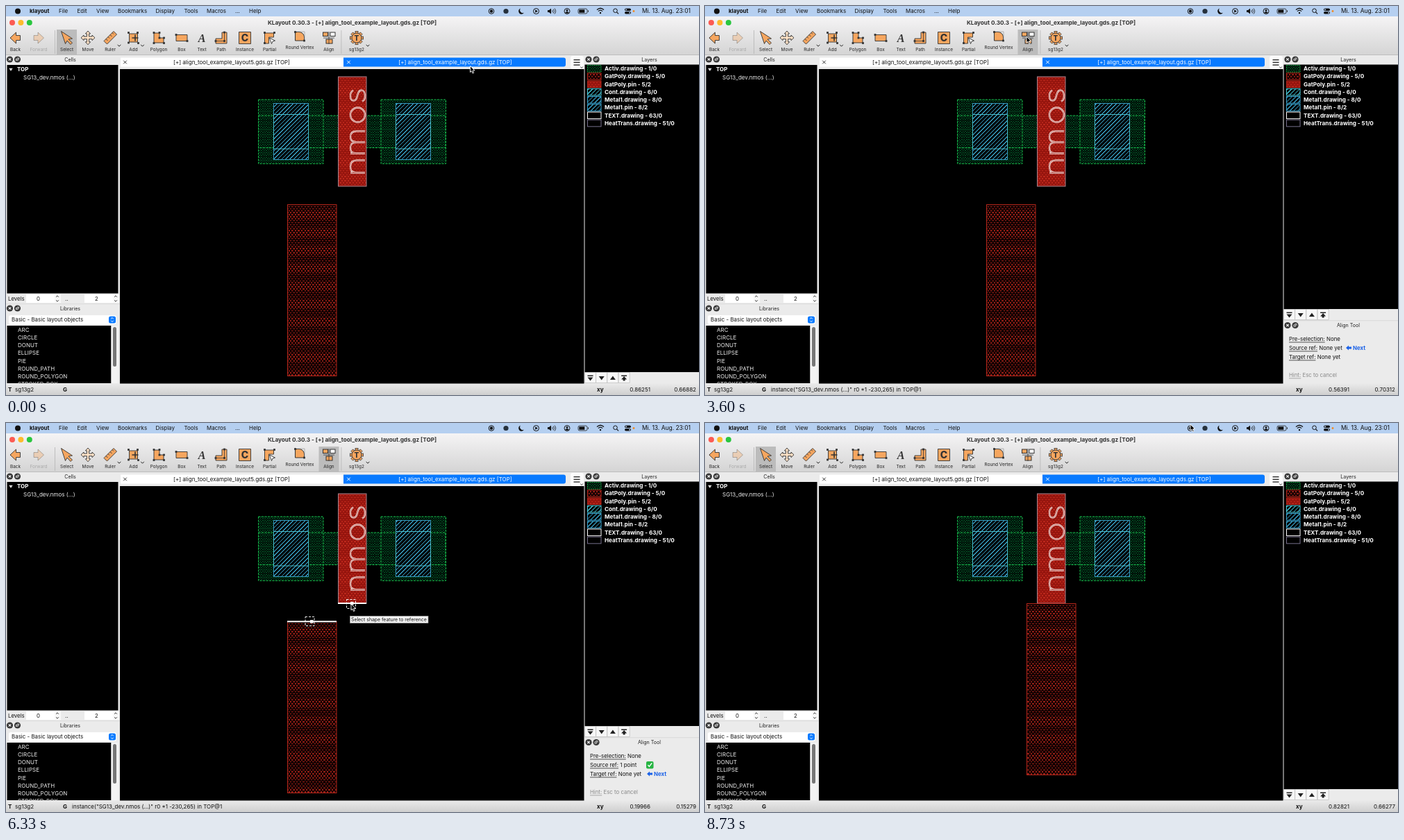
An HTML page with a canvas for the animation above (8.8 s loop, 998x561 px).

```html
<!DOCTYPE html>
<html lang="en">
<head>
<meta charset="utf-8">
<title>Layout alignment</title>
<style>
  html, body { margin: 0; width: 100%; height: 100%; overflow: hidden; background: #000; }
  canvas { display: block; width: 998px; height: 561px; }
</style>
</head>
<body>
<canvas id="stage" width="998" height="561"></canvas>
<script>
const g = document.getElementById('stage').getContext('2d');
const LOOP = 8800;
const ORANGE = '#f6a65f', INK = '#333', BLUE = '#087aff', PANEL = '#ebebeb';

// ---- drawing helpers ----
function rect(x, y, w, h, fill, stroke, lineWidth = 1) {
  if (fill) { g.fillStyle = fill; g.fillRect(x, y, w, h); }
  if (stroke) { g.strokeStyle = stroke; g.lineWidth = lineWidth; g.strokeRect(x, y, w, h); }
}
function round(x, y, w, h, r, fill) {
  g.beginPath(); g.roundRect(x, y, w, h, r); g.fillStyle = fill; g.fill();
}
function disc(x, y, r, fill, stroke, lineWidth = 1) {
  g.beginPath(); g.arc(x, y, r, 0, 7);
  if (fill) { g.fillStyle = fill; g.fill(); }
  if (stroke) { g.strokeStyle = stroke; g.lineWidth = lineWidth; g.stroke(); }
}
function shape(d, x, y, fill, stroke, lineWidth = 1) {
  const path = new Path2D(d);
  g.save(); g.translate(x, y);
  if (fill) { g.fillStyle = fill; g.fill(path); }
  if (stroke) { g.strokeStyle = stroke; g.lineWidth = lineWidth; g.stroke(path); }
  g.restore();
}
// y is the middle of the capital letters
function text(s, x, y, { size = 8, weight = 400, color = '#111', align = 'left', family = 'Inter, sans-serif', style = '' } = {}) {
  g.font = `${style} ${weight} ${size}px ${family}`;
  g.textAlign = align; g.fillStyle = color;
  g.fillText(s, x, y + size * 0.36);
  return g.measureText(s).width;
}
function gradient(y0, y1, from, to) {
  const fill = g.createLinearGradient(0, y0, 0, y1);
  fill.addColorStop(0, from); fill.addColorStop(1, to);
  return fill;
}

// Fill tiles are drawn in screen points and scaled down to the stage.
const POINT = 0.5775, DETAIL = 4;
function pattern(w, h, back, draw) {
  const tile = new OffscreenCanvas(w * DETAIL, h * DETAIL), c = tile.getContext('2d');
  c.scale(DETAIL, DETAIL);
  c.fillStyle = back; c.fillRect(0, 0, w, h);
  draw(c);
  const fill = g.createPattern(tile, 'repeat');
  fill.setTransform(new DOMMatrix().scale(POINT / DETAIL));
  return fill;
}
const dots = (w, h, back, color) => pattern(w, h, back, c => {
  c.fillStyle = color;
  c.fillRect(0, 0, w / 2, h / 4); c.fillRect(w / 2, h / 2, w / 2, h / 4);
});
const hatch = (size, color) => pattern(size, size, '#000', c => {
  c.strokeStyle = color; c.lineWidth = 1.9;
  for (let k = 0; k <= 2; k++) { c.moveTo(k * size + 2, -2); c.lineTo(k * size - size - 2, size + 2); }
  c.stroke();
});
const fills = {
  activ: dots(6, 6, '#001208', '#05592a'),
  poly: dots(8, 10, '#150303', '#981f16'),
  pin: dots(8, 10, '#96150e', '#bd281c'),
  metal: hatch(10, '#369bbd'),
  cont: hatch(10, '#3fc0cf'),
};

// ---- cursor motion ----
const SCALE = 0.003237, ORIGIN = { x: 0.15434, y: 0.13013, px: 483, py: 268 };
const toPixels = (x, y) => [ORIGIN.px + (x - ORIGIN.x) / SCALE, ORIGIN.py - (y - ORIGIN.y) / SCALE];
const toMicrons = ([px, py]) => [ORIGIN.x + (px - ORIGIN.px) * SCALE, ORIGIN.y - (py - ORIGIN.py) * SCALE];
const START = [0.86251, 0.66882], EXIT_TOP = [0.56391, 0.70312], EXIT_END = [0.82821, 0.66277];
const BELOW_TABS = toPixels(0.67487, 0.64663), ASIDE = toPixels(1.0219, 0.26531);
const ALIGN_CLICK = 2850, SOURCE_CLICK = 4850, TARGET_CLICK = 6620;
const SOURCE_POINT = [437.5, 286], TARGET_POINT = [497, 261];
const route = [
  [0, 668.5, 86.5], [200, 668.5, 86.5],
  [850, ...BELOW_TABS], [1100, ...BELOW_TABS],
  [1400, ...toPixels(...EXIT_TOP)], [1950, 421, 34], [2150, 421, 34],
  [2650, 463, 44], [3650, 463, 44],
  [4450, ...SOURCE_POINT], [4950, ...SOURCE_POINT],
  [5400, ...toPixels(0.15434, 0.13013)], [5800, ...TARGET_POINT], [TARGET_CLICK, ...TARGET_POINT],
  [7000, ...ASIDE], [7480, ...ASIDE],
  [8000, ...toPixels(...EXIT_END)], [8300, 699, 2], [LOOP, 699, 2],
];
// Hermite curve through the route; the cursor rests at repeated points.
function tangent(i, axis) {
  const [a, b, c] = [route[i - 1], route[i], route[i + 1]];
  if (!a || !c || a[axis] === b[axis] || b[axis] === c[axis]) return 0;
  return (c[axis] - a[axis]) / (c[0] - a[0]);
}
function cursorAt(t) {
  const i = Math.max(1, route.findIndex(k => k[0] > t));
  const a = route[i - 1], b = route[i], span = b[0] - a[0], u = (t - a[0]) / span;
  return [1, 2].map(axis =>
    a[axis] + (b[axis] - a[axis]) * u * u * (3 - 2 * u)
    + span * u * (1 - u) * ((1 - u) * tangent(i - 1, axis) - u * tangent(i, axis)));
}
const overCanvas = ([x, y]) => x > 164 && x < 832 && y > 92 && y < 544;

// ---- menu bar and toolbar ----
function menuBar() {
  rect(0, 0, 998, 15, '#b5cff0');
  disc(17, 7.5, 4, '#111');
  text('klayout', 34, 7, { size: 7.9, weight: 700 });
  const menus = { File: 76, Edit: 102.5, View: 130, Bookmarks: 161, Display: 215.5, Tools: 256.5, Macros: 289, '...': 330, Help: 350 };
  for (const name in menus) text(name, menus[name], 7, { size: 7.95 });
  disc(699, 7.5, 3.8, null, '#111'); disc(699, 7.5, 2.2, '#111');
  disc(720, 7.5, 3.6, '#26313c');
  shape('M-1,-4A4.2,4.2 0 1 0 4,2A4,4 0 0 1-1,-4Z', 742, 7.5, '#111');
  disc(763.5, 7.5, 4, null, '#111'); shape('M-1.3,-2.3L2.4,0L-1.3,2.3Z', 763.5, 7.5, '#111');
  shape('M-5,-1.5h2l3,-2.5v8l-3,-2.5h-2Z', 785, 7.5, '#111');
  shape('M1.5,-1.6q1.4,1.6 0,3.2M3.2,-3q2.6,3 0,6M5,-4q3.3,4 0,8', 785, 7.5, null, '#111', 0.8);
  disc(808, 7.5, 4, null, '#111'); disc(808, 6.3, 1.4, '#111'); shape('M-2.6,3a2.6,2.6 0 0 1 5.2,0Z', 808, 7.5, '#111');
  g.beginPath(); g.roundRect(824, 4, 13, 7, 2); g.strokeStyle = '#222'; g.lineWidth = 0.8; g.stroke();
  rect(825.3, 5.3, 8, 4.4, '#111'); rect(838, 6.3, 1, 2.4, '#333');
  shape('M-5,-1.5q5,-4.6 10,0M-3.1,.6q3.1,-3 6.2,0', 856, 7, null, '#111', 1.3); disc(856, 10, 1.2, '#111');
  disc(877.5, 6.7, 2.8, null, '#111'); shape('M0,0l2.5,2.5', 879.6, 8.8, null, '#111', 1.2);
  round(891, 3.5, 9, 3.5, 1.8, '#111'); disc(893, 5.2, 1, '#b5cff0');
  round(891, 8, 9, 3.5, 1.8, '#111'); disc(898, 9.8, 1, '#b5cff0');
  disc(904, 7.5, 1.4, '#f08a24');
  text('Mi. 13. Aug. 23:01', 986, 7, { size: 8.45, align: 'right' });
}

const node = (x, y) => rect(x - 1.4, y - 1.4, 2.8, 2.8, INK);
const outlined = (d, x, fill = ORANGE) => shape(d, x, 46, fill, INK, 0.9);
const nodes = (x, ...points) => points.forEach(([dx, dy]) => node(x + dx, 46 + dy));
const ARROW = 'M-7.5,0L1,-8V-3.5H7V3.5H1V8Z';
const tools = [
  ['Back', 13.5, x => outlined(ARROW, x)],
  ['Forward', 47, x => { g.save(); g.globalAlpha = 0.35; g.translate(2 * x, 0); g.scale(-1, 1); outlined(ARROW, x); g.restore(); }],
  ['Select', 87.5, x => outlined('M-8,-9.5L8,1L2.5,2L8,7L5.5,9.5L.5,4L-2,8.5Z', x)],
  ['Move', 118, x => outlined('M0,-10l3.6,4h-2v4h4.4v-2l4,3.8l-4,3.8v-2h-4.4v4.2h2l-3.6,4l-3.6,-4h2v-4.2h-4.4v2l-4,-3.8l4,-3.8v2h4.4v-4h-2Z', x, '#fbe0c5')],
  ['Ruler', 150, x => { outlined('M-9,4.5L5,-9.5L9.5,-5L-4.5,9Z', x); shape('M-6,1.5l2.5,2.5M-3,-1.5l2,2M0,-4.5l2.5,2.5M3,-7.5l2,2', x, 46, null, INK, 0.9); }],
  ['Add', 183.5, x => { outlined('M-6,-6H6V6H-6Z', x); shape('M-2,0h9M2.5,-4.5v9', x, 46, null, INK, 1.6); nodes(x, [-7, -7.5], [6, -7.5], [-7, 7], [7, 7.5]); }],
  ['Polygon', 220, x => { outlined('M-7,-7H1V0H7V7H-7Z', x); nodes(x, [-7, -7.5], [1, -7.5], [1, 0], [7.5, 0], [7.5, 7.5], [-7, 7.5]); }],
  ['Box', 253, x => { outlined('M-8,-4.5H8V4.5H-8Z', x); nodes(x, [-8, -4.5], [8, 4.5]); }],
  ['Text', 282, x => text('A', x, 46, { size: 16, weight: 700, style: 'italic', align: 'center', family: 'Liberation Serif, serif', color: INK })],
  ['Path', 310, x => { outlined('M-8,1H1V-8H8V8H-8Z', x); shape('M-8,4.5H4.5V-8', x, 46, null, INK, 0.8); nodes(x, [-8, 4.5], [4.5, 4.5], [4.5, -8]); }],
  ['Instance', 344, x => { outlined('M-8.5,-8.5H8.5V8.5H-8.5Z', x); text('C', x, 46, { size: 14, weight: 800, align: 'center', color: INK }); }],
  ['Partial', 379.5, x => { outlined('M-7,-7H6V-1H-1V8H-7Z', x); nodes(x, [-7, -7.5], [7, -7.5], [-7, 7.5]); shape('M0,0L8,4L4.5,5L3,8.5Z', x, 46, '#fff', INK, 0.9); }],
  ['Round Vertex', 423, x => { shape('M-6.5,-6H-1A7.5,7.5 0 0 1 6.5,1.5V6.5H-6.5Z', x, 43.5, ORANGE, INK); node(x - 6.5, 37.5); node(x + 6.5, 50); shape('M-4,-6.5H7V5', x, 43.5, null, '#999', 0.7); }],
  ['Align', 465, x => { rect(x - 8.5, 38, 7, 5.5, ORANGE, INK); rect(x + 2, 38, 7, 5.5, '#fff', INK); rect(x - 4, 48, 9, 6, ORANGE, INK); shape('M0,-9V9M-8,0H8', x, 46, null, INK, 0.8); }],
  ['sg13g2', 505, x => {
    for (let k = 0; k < 8; k++) { g.save(); g.translate(x, 46); g.rotate(k * Math.PI / 4); rect(-2, -9.5, 4, 4, ORANGE, INK, 0.8); g.restore(); }
    disc(x, 46, 7, ORANGE, INK, 0.9);
    text('T', x, 46, { size: 10, weight: 800, align: 'center', color: INK });
  }],
];
function toolbar(active) {
  rect(0, 15, 998, 56, gradient(15, 71, '#f5f4f5', '#d4d4d4'));
  ['#fc5b53', '#fdbb2d', '#2ac63f'].forEach((c, i) => disc(9 + 12.4 * i, 24, 4, c));
  text('KLayout 0.30.3 - [+] align_tool_example_layout.gds.gz [TOP]', 498.5, 24, { size: 8.2, weight: 700, align: 'center', color: '#333' });
  rect(70, 35, 0.8, 34, '#b5b5b5'); rect(482.5, 35, 0.8, 34, '#b5b5b5');
  for (const [name, x, icon] of tools) {
    if (name === active) rect(x - 14.5, 34, 29, 36, '#bcbcbc');
    icon(x);
    text(name, x, name === 'Round Vertex' ? 60 : 62.5, { size: 6.45, align: 'center', color: name === 'Forward' ? '#aaa' : '#222' });
  }
  for (const x of [163, 196.5, 521]) shape('M-2.3,-1.2L0,1.2L2.3,-1.2', x, 57, null, '#222');
  rect(0, 70, 998, 1, '#bdbdbd');
}

// ---- docks ----
function dockTitle(name, x, y, center) {
  disc(x, y, 4.6, '#383838'); shape('M-1.7,-1.7L1.7,1.7M1.7,-1.7L-1.7,1.7', x, y, null, '#fff', 1.1);
  disc(x + 11, y, 4.6, '#383838'); rect(x + 9, y - 0.6, 2.6, 2.2, null, '#fff', 0.7); shape('M10.4,-2h2.6v2.4', x, y, null, '#fff', 0.7);
  text(name, center, y, { size: 7.1, align: 'center', color: '#222' });
}
function spinner(x, value, valueX) {
  rect(x, 416, 50, 12, '#fff');
  text(value, valueX, 422, { size: 7.85, align: 'center' });
  round(x + 41, 415.5, 9, 13, 3, '#f8f8f8');
  shape('M-1.9,-2.3L0,-4.2L1.9,-2.3M-1.9,2.3L0,4.2L1.9,2.3', x + 45, 422, null, '#333', 1);
}
function leftDocks() {
  rect(0, 71, 164, 474, PANEL);
  dockTitle('Cells', 5.5, 77, 92.5);
  rect(1.5, 85, 160, 329.5, '#000');
  shape('M-2.7,-1.7H2.7L0,2.6Z', 7, 91.5, '#ddd');
  text('TOP', 16, 91.5, { weight: 700, color: '#fff' });
  text('SG13_dev.nmos (...)', 25, 103, { color: '#eee' });
  text('Levels', 3, 422, { size: 7.85 });
  spinner(29, '0', 46.5); text('..', 85, 422); spinner(113, '2', 130.5);
  rect(0, 429.5, 164, 0.6, '#cfcfcf');
  dockTitle('Libraries', 5.5, 436, 92.5);
  round(4, 446, 155, 13, 3, '#fff');
  text('Basic - Basic layout objects', 8, 452.5, { size: 7.95 });
  round(148, 447.5, 10, 10, 2.5, BLUE);
  shape('M-1.8,-1.2L0,-3L1.8,-1.2M-1.8,1.2L0,3L1.8,1.2', 153, 452.5, null, '#fff', 1);
  rect(1.5, 461, 150, 83, '#000'); rect(151.5, 461, 10, 83, '#f3f3f3');
  round(154, 463, 5, 57, 2.5, '#777');
  g.save(); g.beginPath(); g.rect(1.5, 461, 150, 83); g.clip();
  ['ARC', 'CIRCLE', 'DONUT', 'ELLIPSE', 'PIE', 'ROUND_PATH', 'ROUND_POLYGON', 'STROKED_BOX']
    .forEach((name, i) => text(name, 17, 467 + 11.2 * i, { color: '#eee' }));
  g.restore();
}

const layers = [
  ['Activ.drawing - 1/0', fills.activ, '#14a845', [2, 1]],
  ['GatPoly.drawing - 5/0', fills.poly, '#b2261b'],
  ['GatPoly.pin - 5/2', fills.pin, '#b2261b'],
  ['Cont.drawing - 6/0', fills.cont, '#4fd0dc'],
  ['Metal1.drawing - 8/0', fills.metal, '#38a4d0'],
  ['Metal1.pin - 8/2', fills.metal, '#38a4d0'],
  ['TEXT.drawing - 63/0', '#000', '#fff'],
  ['HeatTrans.drawing - 51/0', '#000', '#77708c'],
];
function alignDock(hasSource) {
  rect(833, 453.5, 165, 0.7, '#cfcfcf');
  dockTitle('Align Tool', 839, 460.5, 926.5);
  const row = (label, value, y, color = '#111') => {
    const w = text(label, 841, y, { size: 7.85, color });
    rect(841, y + 4.6, w, 0.7, color);
    text(value, 841 + w + 2.3, y, { size: 7.85, color });
  };
  row('Pre-selection:', 'None', 480);
  row('Source ref:', hasSource ? '1 point' : 'None yet', 493);
  row('Target ref:', 'None yet', 506);
  row('Hint:', 'Esc to cancel', 532, '#888');
  const y = hasSource ? 506 : 493;
  shape('M-4,0L0,-3.5V-1.4H4V1.4H0V3.5Z', 927, y, '#1b62e8');
  text('Next', 933, y, { size: 7.85, weight: 700, color: '#1b62e8' });
  if (hasSource) {
    round(922, 488, 10.5, 10.5, 2, '#27b443');
    shape('M-2.8,.2L-.8,2.4L3,-2.6', 927.2, 493, null, '#fff', 1.5);
  }
}
function rightDocks(aligning, hasSource) {
  const bottom = aligning ? 437 : 528;
  rect(832.5, 71, 166, 474, PANEL);
  dockTitle('Layers', 839, 77, 926.5);
  rect(833.5, 84.5, 165, bottom - 84.5, '#000');
  layers.forEach(([name, fill, stroke, dash], i) => {
    const y = 90.3 + 11.25 * i;
    g.setLineDash(dash || []);
    rect(837.5, y - 4.8, 19.5, 9.6, fill, stroke);
    g.setLineDash([]);
    text(name, 862, y, { size: 8.15, weight: 700, color: '#fff' });
  });
  ['M-4,-4H4V-2.6H-4ZM-4,-1H4L0,4Z', 'M-4,-2.5H4L0,3Z', 'M-4,2.5H4L0,-3Z', 'M-4,-4H4V-2.6H-4ZM-4,2H4L0,-2.5ZM-1.5,2H1.5V4H-1.5Z'].forEach((d, i) => {
    rect(833.5 + 16.2 * i, bottom + 0.5, 16, 15, '#f7f7f7', '#bbb', 0.7);
    shape(d, 841.5 + 16.2 * i, bottom + 8.5, '#222');
  });
  if (aligning) alignDock(hasSource);
}

// ---- layout view ----
function tabs() {
  rect(164, 71, 669, 20, PANEL);
  rect(165, 74.5, 321, 13, '#fff');
  round(486, 74.5, 320, 13, [0, 3, 3, 0], BLUE);
  const cross = 'M-2.3,-2.3L2.3,2.3M2.3,-2.3L-2.3,2.3';
  shape(cross, 171.5, 81, null, '#333'); shape(cross, 493.5, 81, null, '#fff');
  text('[+] align_tool_example_layout5.gds.gz [TOP]', 325, 81, { align: 'center' });
  text('[+] align_tool_example_layout.gds.gz [TOP]', 647, 81, { align: 'center', color: '#fff' });
  round(813, 72, 19, 19, 3, '#fbfbfb');
  for (const y of [77, 80.7, 84.4]) rect(817.5, y, 9, 1.3, '#222');
  shape('M-1.8,-1L0,1L1.8,-1', 829, 88.5, null, '#333', 0.9);
}
function label() {
  const glyphs = new Path2D('M0,0V-21M0,-13C1,-20 4,-21 9,-21S18,-19 18,-12V0' +
    'M28,0V-21M28,-13C29,-20 31,-21 36,-21S44,-19 44,-12V0M44,-12C45,-20 48,-21 52,-21S60,-19 60,-12V0' +
    'M73,-10.5a10.5,10.5 0 1 1 21,0a10.5,10.5 0 1 1 -21,0' +
    'M119,-17C115,-23 104,-22 104,-16C104,-9 119,-13 119,-5C119,1 106,2 103,-4');
  g.save(); g.translate(517, 240.5); g.rotate(-Math.PI / 2);
  g.strokeStyle = '#f2e4e2'; g.lineWidth = 2.4; g.stroke(glyphs);
  g.strokeStyle = '#b5453b'; g.lineWidth = 0.8; g.stroke(glyphs);
  g.restore();
}
function transistor() {
  const green = '#16b849';
  rect(364, 158, 269, 46.5, fills.activ);
  for (const x of [363.5, 540]) rect(x, 135, 93.5, 92.5, fills.activ);
  g.setLineDash([3, 1.5]);
  rect(363.5, 158, 269.5, 46.5, null, green);
  for (const x of [363.5, 540]) rect(x, 135, 93.5, 92.5, null, green);
  g.setLineDash([]);
  for (const x of [385.5, 561.5]) {
    rect(x, 140.5, 50, 81, fills.metal, '#3699c0');
    rect(x, 156.5, 50, 49.5, null, '#48c0d0');
  }
  rect(478.5, 102, 40.5, 158, fills.pin, '#a8848e');
  label();
}
function featureMarker({ x0, x1, y }, [boxX, boxY]) {
  rect(x0, y - 1, x1 - x0, 2, '#fff');
  g.setLineDash([3, 2]);
  rect(boxX - 6.5, boxY - 6.5, 13, 13, null, '#fff');
  g.setLineDash([]);
  rect((x0 + x1) / 2 - 2.5, y - 2.2, 4.5, 4.5, '#fff');
}
const SOURCE_EDGE = { x0: 405, x1: 476, y: 286.3 }, TARGET_EDGE = { x0: 478, x1: 519, y: 260 };
const near = ({ x0, x1, y }, [px, py]) => px > x0 && px < x1 && Math.abs(py - y) < 6;

function pointer([x, y]) {
  shape('M0,0V9L2,7.2L3.6,10.6L5.1,9.9L3.6,6.7L6.5,6.5Z', x, y, '#000', '#fff', 0.9);
}
function tooltip([x, y]) {
  rect(x - 1.5, y + 17.5, 112.5, 10, '#f4f4f4', '#999', 0.7);
  text('Select shape feature to reference', x, y + 22.5, { size: 6.9 });
}
function statusBar(info, coords) {
  rect(0, 544.5, 998, 16.5, gradient(545, 561, '#e9e9e9', '#cfcfcf'));
  text('T', 3, 553, { weight: 700 }); text('sg13g2', 13, 553);
  text('G', 82, 553, { weight: 700 });
  if (info) text('instance("SG13_dev.nmos (...)" r0 *1 -230,265) in TOP@1', 95, 553);
  text('xy', 851, 553, { weight: 700 });
  text(coords[0].toFixed(5), 928, 553, { align: 'right' });
  text(coords[1].toFixed(5), 994, 553, { align: 'right' });
}

function draw(t) {
  const cursor = cursorAt(t), inside = overCanvas(cursor);
  const moved = t >= TARGET_CLICK, hasSource = t >= SOURCE_CLICK;
  const aligning = t >= ALIGN_CLICK && !moved;
  const held = t < 1000 ? START : t < 5000 ? EXIT_TOP : EXIT_END;
  // The hovered instance stays named until the cursor leaves it in select mode.
  const named = t > 1000 && (!moved || t < ASIDE_TIME) && cursor[0] < 633;

  rect(164, 91, 669, 454, '#000');
  transistor();
  const [px, py] = moved ? [463.5, 260.5] : [405.5, 286.5];
  rect(px, py, 70.5, 247, fills.poly, '#b2261b');
  if (aligning) {
    if (hasSource) featureMarker(SOURCE_EDGE, SOURCE_POINT);
    else if (near(SOURCE_EDGE, cursor)) featureMarker(SOURCE_EDGE, cursor);
    if (hasSource && near(TARGET_EDGE, cursor)) featureMarker(TARGET_EDGE, cursor);
  }

  menuBar();
  toolbar(aligning ? 'Align' : 'Select');
  tabs();
  leftDocks();
  rightDocks(aligning, hasSource);
  statusBar(named, inside ? toMicrons(cursor) : held);
  if (aligning && inside) tooltip(cursor);
  pointer(cursor);
}
const ASIDE_TIME = 7000;

function tick(now) {
  draw(now % LOOP);
  requestAnimationFrame(tick);
}
draw(0);
requestAnimationFrame(tick);
</script>
</body>
</html>
```
